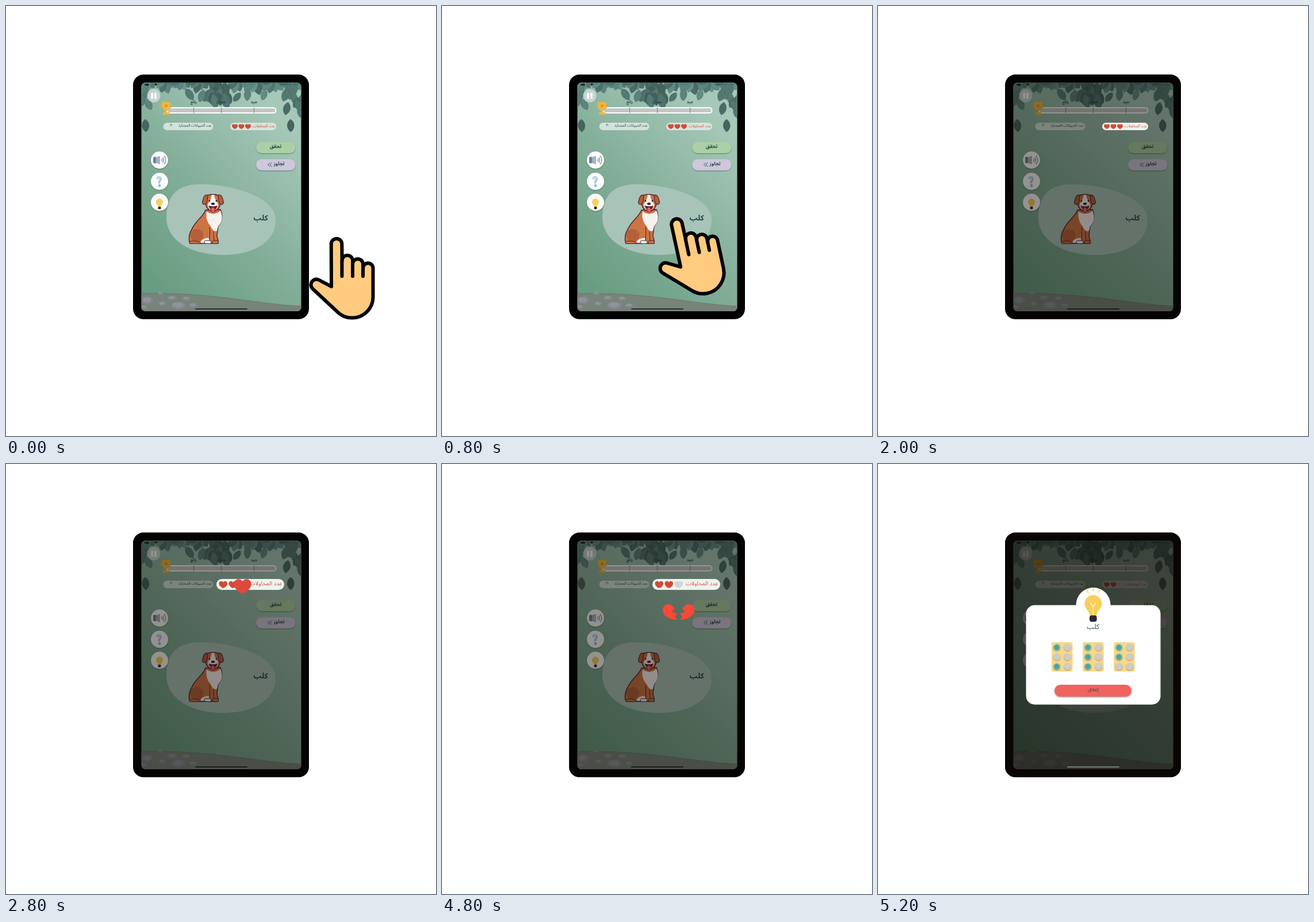
Write an HTML page with a canvas that moves like this. It is 748 px wide and 748 px high and loops after 5600 ms.

```html
<!DOCTYPE html>
<html lang="ar">
<head>
<meta charset="utf-8">
<title>Hint animation</title>
<style>
  html, body { margin: 0; width: 100%; height: 100%; overflow: hidden; background: #fff; }
  canvas { display: block; width: 748px; height: 748px; }
</style>
</head>
<body>
<canvas id="stage"></canvas>
<script>
const SIZE = 748, LOOP = 5600, STEP = 200, PI = Math.PI;
const canvas = document.getElementById('stage');
const ratio = window.devicePixelRatio || 1;
canvas.width = canvas.height = SIZE * ratio;
const ctx = canvas.getContext('2d');
const FONT = '"Noto Sans Arabic", "Noto Sans", "DejaVu Sans", sans-serif';
const INK = '#21484a', RED = '#d14b37';

// ---- helpers ----
function paint(fill, stroke, width = 1) {
  if (fill) { ctx.fillStyle = fill; ctx.fill(); }
  if (stroke) { ctx.strokeStyle = stroke; ctx.lineWidth = width; ctx.stroke(); }
}
function box(x, y, w, h, r, fill, stroke, width) {
  ctx.beginPath();
  ctx.roundRect(x, y, w, h, r);
  paint(fill, stroke, width);
}
function oval(x, y, rx, ry, fill, stroke, width) {
  ctx.beginPath();
  ctx.ellipse(x, y, rx, ry, 0, 0, 2 * PI);
  paint(fill, stroke, width);
}
function shape(d, fill, stroke, width = 1) {
  const p = new Path2D(d);
  if (fill) { ctx.fillStyle = fill; ctx.fill(p); }
  if (stroke) { ctx.strokeStyle = stroke; ctx.lineWidth = width; ctx.stroke(p); }
}
function text(str, x, y, size, color, align = 'center', weight = 400) {
  ctx.font = `${weight} ${size}px ${FONT}`;
  ctx.direction = 'rtl';
  ctx.textAlign = align;
  ctx.textBaseline = 'middle';
  ctx.fillStyle = color;
  ctx.fillText(str, x, y);
}
function group(fn) { ctx.save(); fn(); ctx.restore(); }
function shadow(blur, dy, color = 'rgba(20,50,40,.4)') {
  ctx.shadowBlur = blur * ratio;
  ctx.shadowOffsetY = dy * ratio;
  ctx.shadowColor = color;
}
function rng(seed) {
  return () => (seed = (seed * 16807) % 2147483647) / 2147483647;
}

// ---- scenery ----
function leaf(x, y, len, angle, light) {
  group(() => {
    ctx.translate(x, y);
    ctx.rotate(angle);
    const w = len * 0.36, c = l => `hsl(170 18% ${l}%)`;
    ctx.beginPath();
    ctx.moveTo(0, 0);
    ctx.bezierCurveTo(len * .25, -w, len * .75, -w, len, 0);
    ctx.bezierCurveTo(len * .75, w, len * .25, w, 0, 0);
    paint(c(light), c(light - 4), .5);
    ctx.beginPath();
    ctx.moveTo(0, 0);
    ctx.lineTo(len * .9, 0);
    paint(null, c(light + 6), .5);
  });
}
function foliage() {
  const r = rng(77);
  const fan = (x, y, n, len) => {
    for (let i = 0; i < n; i++)
      leaf(x, y, len * (.8 + r() * .4), PI * (i + .5) / n, 35 + r() * 14);
  };
  const cluster = (n, x, y, w, h, len, light) => {
    for (let i = 0; i < n; i++)
      leaf(x + w * r(), y + h * i / n, len * (.8 + r() * .4), PI / 2 + (r() - .5) * 1.2, light + r() * 9);
  };
  for (const x of [244, 276, 306, 336, 402, 434, 464, 496]) fan(x, 128, 6, 23);
  cluster(5, 236, 134, 10, 34, 21, 36);
  cluster(18, 356, 128, 25, 27, 24, 31);
  cluster(10, 484, 134, 30, 42, 23, 35);
  leaf(313, 144, 23, 1.0, 40);
  leaf(344, 146, 22, 1.9, 43);
  leaf(396, 166, 19, -.9, 38);
  leaf(421, 143, 22, 1.65, 43);
  leaf(452, 145, 20, 1.9, 46);
  leaf(242, 197, 22, 1.5, 33);
  leaf(495, 197, 22, 1.55, 33);
}
function ground() {
  shape('M235 500 C300 499 350 503 410 511 S490 521 514 522 V532 H235Z', '#78837a', '#64736a', .8);
  const stones = [[246, 512, 10, 7], [300, 521, 13, 7], [289, 508, 8, 4], [314, 509, 7, 3.5],
    [269, 500, 5, 3], [272, 518, 6, 4], [326, 521, 7, 4], [241, 524, 5, 3]];
  for (const [x, y, rx, ry] of stones) {
    oval(x, y, rx, ry, '#82878b');
    oval(x - 1, y - 1, rx * .75, ry * .65, '#90929c');
  }
  box(329, 526, 91, 2, 1, '#292f2c');
}

// ---- hearts ----
const HALF = 'M0 0 C-6 -1.500 -18.500 -10 -18.500 -20 C-18.500 -33 -4 -34 0 -26';
const CRACK = ' L3 -20 L-4 -16 L4 -10 L-2 -6 Z';
function heart(x, y, w, color) {
  group(() => {
    ctx.translate(x, y);
    ctx.scale(w / 37, w / 37);
    ctx.translate(0, 15.3);
    shape(HALF + ' C4 -34 18.500 -33 18.500 -20 C18.500 -10 6 -1.500 0 0Z', color);
  });
}
function brokenHeart(angle, gap, drop) {
  for (const side of [1, -1]) group(() => {
    ctx.translate(411.5 - side * gap, 250 + drop);
    ctx.scale(side, 1);
    ctx.rotate(-angle * PI / 180);
    shape(HALF + CRACK, '#fb4938');
  });
}

// ---- screen parts ----
function triesPill(cx, cy, scale, left, bright) {
  group(() => {
    ctx.translate(cx, cy);
    ctx.scale(scale, scale);
    box(-40, -6.5, 80, 13, 6.5, bright ? '#edf3ee' : '#d6e4dd');
    for (let i = 0; i < 3; i++) heart(-32 + i * 11.5, .3, 10, i < left ? RED : '#d3d3d6');
    text('عدد المحاولات', 37.5, 0, 6.6, '#d4503f', 'right');
  });
}
function trophy() {
  oval(278.5, 174, 9, 4.5, null, '#e0a838', 1.6);
  shape('M271 167 H286 C286 178 284 181 280 182 V185 H284 V189 H273 V185 H277 V182 C273 181 271 178 271 167Z', '#edb740');
  oval(278.5, 173.5, 2.6, 2.6, '#d89a2c');
}
function progress() {
  box(280, 177, 189.5, 9, 4.5, '#c3c6c5', '#fff', 2);
  [['جيد', 431.5], ['ممتاز', 374.5], ['رائع', 326.5]].forEach(([label, x]) => {
    text(label, x, 168, 7, INK, 'center', 700);
    group(() => {
      ctx.setLineDash([2, 1.2]);
      ctx.beginPath();
      ctx.moveTo(x, 177);
      ctx.lineTo(x, 187);
      paint(null, '#4c5555', 1);
    });
  });
  trophy();
}
function wideButton(y, fill) {
  group(() => { shadow(2, 1.2); box(435, y, 68.5, 19.5, 9.7, fill); });
}
function statusBar() {
  box(241, 135.5, 8, 3, 1.5, '#17211e');
  box(251, 136, 5, 2, 1, '#55756b');
  shape('M258 136 Q260.500 133.500 263 136 L260.500 139Z', '#17211e');
  text('٢:٣٦ م  الأحد ٢١ يوليو', 509, 137, 4, '#263c35', 'right');
}
function bulb(x, y, r) {
  shape(`M${x - r} ${y} A${r} ${r} 0 1 1 ${x + r} ${y} C${x + r} ${y + r * .65} ${x + r * .45} ${y + r * .7} ${x + r * .42} ${y + r * 1.35}
    H${x - r * .42} C${x - r * .45} ${y + r * .7} ${x - r} ${y + r * .65} ${x - r} ${y}Z`, '#f8cf58');
  box(x - r * .42, y + r * 1.35, r * .84, r * .75, r * .25, '#2c2b2b');
}
function sideButtons() {
  for (const y of [268, 305, 341.5])
    group(() => { shadow(2.5, 1); oval(267, y, 15, 15, '#fdfdfd'); });
  box(256, 262.5, 6, 11, 1.5, '#6e8295');
  shape('M261 263 L268 260.500 V275.500 L261 273Z', '#a7b3bd');
  for (const r of [3, 6, 9.5]) {
    ctx.beginPath();
    ctx.arc(268.5, 268, r, -.85, .85);
    paint(null, '#73899b', 1.3);
  }
  group(() => {
    ctx.lineCap = 'round';
    shape('M263.500 299.500 C265 297 269.500 298 269 301.500 C268.500 304 266.500 304 266.500 307', null, '#a9c9e2', 4);
    shape('M264 299 C265.500 297.500 268 298 268.500 300', null, '#d5e8f5', 1.4);
  });
  oval(267, 312.5, 2.4, 2.4, '#8fb8da');
  bulb(267, 341, 6);
  for (const a of [-2.5, -2, -1.57, -1.14, -.64]) {
    ctx.beginPath();
    ctx.moveTo(267 + 8.5 * Math.cos(a), 341 + 8.5 * Math.sin(a));
    ctx.lineTo(267 + 11 * Math.cos(a), 341 + 11 * Math.sin(a));
    paint(null, '#f6dda0', .8);
  }
}
function dog() {
  const line = '#4b2030', fur = '#cc7444', deep = '#b4603a', pale = '#f7f2f0';
  ctx.lineJoin = 'round';
  shape('M347 355 C343 367 328 375 323 389 C317 398 318 409 320 413 L369 413 C371 409 367 405 367 399 L369 383 C377 375 377 363 373 354Z', fur, line, 1.4);
  oval(332, 399, 11.5, 11, deep);
  shape('M338 411 C341 405 348 403 353 404 L354 412 H338Z', pale);
  shape('M349 357 C355 363 367 363 373 356 C378 367 376 377 369 383 L367 391 C362 394 358 388 356 383 C350 377 347 367 349 357Z', pale);
  shape('M354 385 C356 395 353 403 355 412 M361 392 C361 400 362 406 362 412', null, line, 1);
  box(345, 408, 12, 5.3, 2.5, pale, line, 1);
  box(359, 408, 10.5, 5.3, 2.5, fur, line, 1);
  shape('M318.500 411 C322 407 338 409 340 413.300 H320Z', fur, line, 1);
  shape('M348 333 C350 326 370 326 372 333 C374 343 373 350 367 355 C363 358 357 358 353 355 C347 350 346 343 348 333Z', fur, line, 1.4);
  shape('M357.500 328.500 H362.500 C362 337 369 341 369 347 C368 357 352 357 351 347 C351 341 358 337 357.500 328.500Z', pale);
  shape('M351 329 C344 327 343 336 341.500 342 C344 348 349 345 350 339Z', deep, line, 1.2);
  shape('M369 329 C376 327 377 336 378.500 342 C376 348 371 345 370 339Z', deep, line, 1.2);
  shape('M352.500 347 Q360 350 367.500 347 C367 357 354 357 352.500 347Z', '#5d1e30');
  oval(360, 354.5, 3.5, 4.5, '#ee5b68', line, .7);
  oval(360, 344, 3.2, 2.1, '#33212b');
  oval(354, 339, 1.4, 1.7, '#33212b');
  oval(366, 339, 1.4, 1.7, '#33212b');
}
function scene(left) {
  const g = ctx.createLinearGradient(245, 470, 500, 215);
  g.addColorStop(0, '#699d82');
  g.addColorStop(.45, '#82ad98');
  g.addColorStop(1, '#a6c8b9');
  ctx.fillStyle = g;
  ctx.fillRect(235, 133, 279, 399);
  ground();
  foliage();
  statusBar();
  oval(257, 156, 11.5, 11.5, 'rgba(206,217,213,.88)');
  box(252.3, 151, 3.6, 10.5, 1, '#fff');
  box(258.2, 151, 3.6, 10.5, 1, '#fff');
  progress();
  box(273.5, 203, 87, 13, 6.5, '#d3e2da');
  text('عدد الحيوانات المجتازة', 357.5, 209.5, 6.4, '#2a4644', 'right');
  text('٣٠', 288, 209.5, 6.5, '#2a4644');
  triesPill(430, 209.5, 1, left);
  wideButton(236.5, '#abd0a6');
  text('تحقق', 469, 246, 8.5, INK, 'center', 700);
  wideButton(266.5, '#cfc7db');
  text('تجاوز', 475, 276, 8.5, INK, 'center', 700);
  shape('M459 272.500 L455.500 276 L459 279.500 M462.500 272.500 L459 276 L462.500 279.500', null, INK, .9);
  shape('M279 368 C279 328 300 310 338 310 C390 310 469 331 469 372 C469 414 425 433 378 433 C322 433 279 408 279 368Z', '#a8c3b8');
  text('كلب', 443, 371, 13, '#24464a', 'center', 700);
  sideButtons();
  dog();
}

function device(left, shade = 0) {
  box(221, 119.3, 306, 425.5, 18, '#000');
  group(() => {
    ctx.beginPath();
    ctx.roundRect(235.5, 133.5, 278, 397.5, 7);
    ctx.clip();
    scene(left);
  });
  if (shade) box(221, 119.3, 306, 425.5, 18, `rgba(14,10,5,${shade})`);
}

// ---- hand, centred on the palm ----
function hand(x, y, degrees, { thumb = [-62, -21], pinky = -50, palm = 36.5 } = {}) {
  group(() => {
    ctx.translate(x, y);
    ctx.rotate(degrees * PI / 180);
    ctx.lineJoin = ctx.lineCap = 'round';
    ctx.beginPath();
    ctx.moveTo(-36, -18);
    ctx.arc(-27, -92, 9.3, PI, 0);
    ctx.arc(-8.2, -63, 9.2, PI, 0);
    ctx.arc(10, -57, 9, PI, 0);
    ctx.arc(27.8, pinky, 8.7, PI, 0);
    ctx.ellipse(0, 0, 36.5, palm, 0, 0, .75 * PI);
    ctx.arc(...thumb, 9.5, .75 * PI, 1.62 * PI);
    ctx.closePath();
    paint('#ffcb80', '#000', 6);
    ctx.beginPath();
    for (const [fx, fy] of [[-17.6, -63], [1, -57], [19, pinky]]) {
      ctx.moveTo(fx, fy);
      ctx.lineTo(fx, -36);
    }
    paint(null, '#000', 6);
  });
}
const handX = [602, 566, 528, 495, 454, 406, 368, 333];
const handY = [506, 499, 493, 479, 464, 450, 436, 428];

function tap() {
  box(249.5, 323.5, 34.5, 35, 0, null, '#c8553a', 1.2);
  group(() => {
    ctx.lineCap = 'round';
    ctx.beginPath();
    ctx.arc(278, 355, 27, 1.94, -.36);
    paint(null, '#000', 6);
  });
  hand(363.5, 402.5, -45, { thumb: [-73, -35], pinky: -46, palm: 27 });
}

// ---- losing a try ----
function loseTry(step) {
  device(3, .44);
  const i = Math.min(step - 10, 3);
  const x0 = [390, 375, 374, 366][i], x1 = [470, 473, 483, 484][i];
  triesPill((x0 + x1) / 2, [209.5, 208.3, 209, 209.5][i], (x1 - x0) / 80, step < 14 ? 3 : 2, true);
  if (step < 14) return;
  if (step < 19) {
    const k = step - 14;
    heart(411.5, 213 + k * 5.4, k ? 37 : 30, '#de493d');
    return;
  }
  const split = [[2, .5, .5], [2, .5, .5], [6, .7, .5], [11, 1.2, 1], [12, 1.2, 12], [20, 2.5, 21]];
  brokenHeart(...split[step - 19]);
}

// ---- hint dialog ----
function braille(x, dots) {
  box(x, 310, 36.5, 51, 3, '#f5d88b');
  for (let i = 0; i < 6; i++) {
    const cx = x + (i < 3 ? 9 : 27.5), cy = 319 + (i % 3) * 16.7;
    const on = dots.includes(i + 1);
    group(() => { shadow(1.5, .8, 'rgba(90,70,30,.5)'); oval(cx, cy, 6, 6, on ? '#83bda5' : '#cccccc'); });
    if (on) oval(cx, cy, 4.3, 4.3, '#4fa39b');
  }
}
function dialog() {
  device(2, .69);
  box(329, 526, 91, 2, 1, '#777c79');
  oval(374.5, 245, 30, 30, '#fff');
  box(257.5, 245.5, 234, 173, 15, '#fff');
  bulb(374.3, 243, 15);
  shape('M374.300 263 V248 M374.300 248 L369.500 241 M374.300 248 L379.500 241', null, '#fff2c5', 1.6);
  shape('M366 224 L363 219 M374.300 222 V215.500 M382.500 224 L385.500 219', null, '#f8cf58', 1.6);
  text('كلب', 374, 285, 12, '#2b5655');
  braille(302, [1, 3]);
  braille(356.2, [1, 2, 3]);
  braille(410.2, [1, 2]);
  group(() => { shadow(2, 1.5, 'rgba(0,0,0,.35)'); box(307, 384, 134, 20.5, 10.2, '#f1635e'); });
  text('إغلاق', 374.3, 394, 9, '#4a3540');
}

// ---- timeline ----
function draw(step) {
  ctx.setTransform(ratio, 0, 0, ratio, 0, 0);
  ctx.fillStyle = '#fff';
  ctx.fillRect(0, 0, SIZE, SIZE);
  if (step < 8) {
    device(3);
    hand(handX[step], handY[step], -3 * step);
  } else if (step < 10) {
    device(3);
    tap();
  } else if (step < 25) loseTry(step);
  else if (step < 26) device(2);
  else dialog();
}

const start = performance.now();
let shown = -1;
function tick() {
  const step = Math.floor(((performance.now() - start) % LOOP) / STEP);
  if (step !== shown) draw(shown = step);
  requestAnimationFrame(tick);
}
tick();
</script>
</body>
</html>
```
